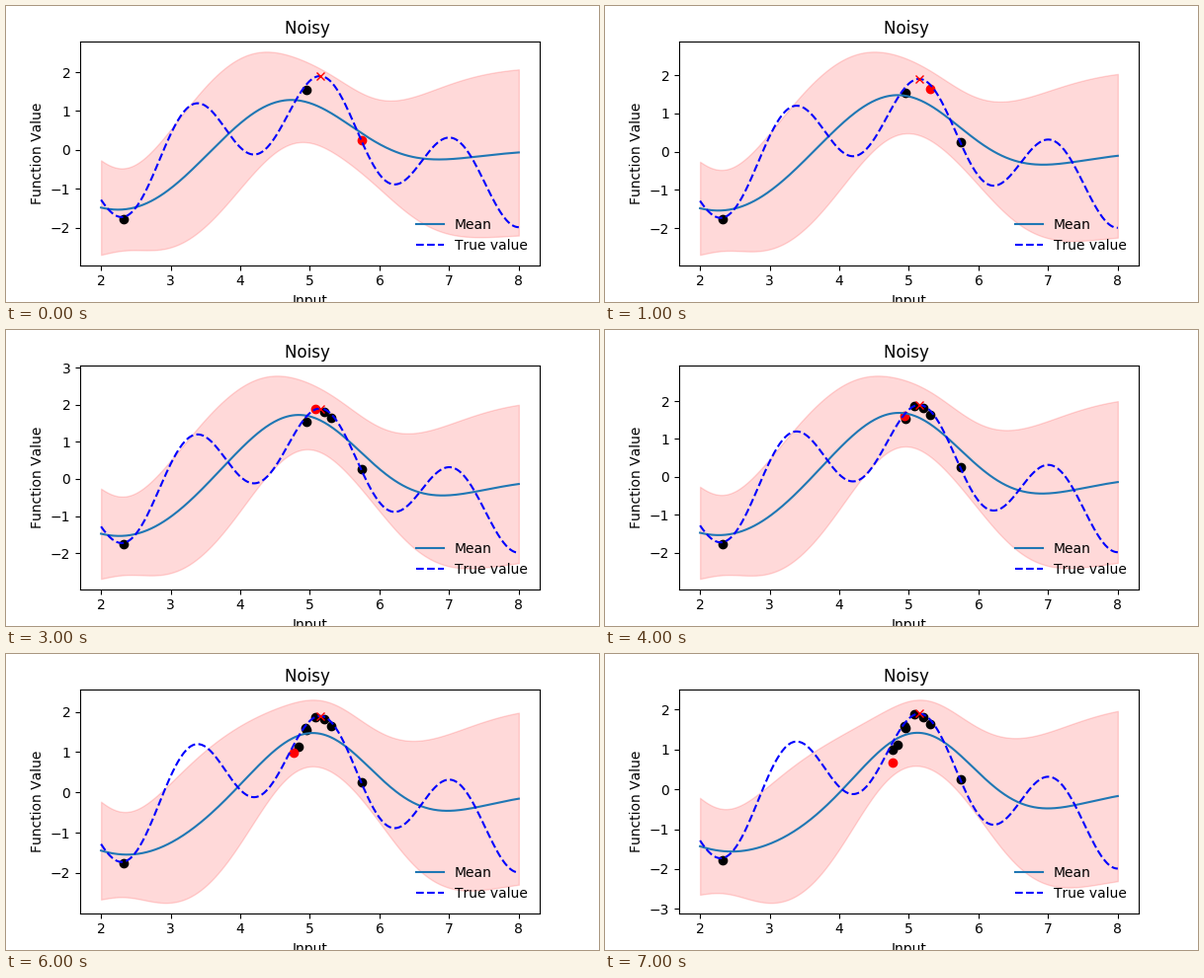
Animation, 600 px wide and 300 px high, one loop 8 s. Source, as a matplotlib script:

```python
import numpy as np
import matplotlib.pyplot as plt
from matplotlib.animation import FuncAnimation

plt.rcParams["text.kerning_factor"] = 6

NOISE = 0.15
LO, HI = 2, 8
FIRST = 3  # samples known at the start

# Noisy samples in the order they are taken
SAMPLES = np.array([
    (2.33, -1.77), (4.95, 1.54), (5.75, 0.26), (5.3, 1.64), (5.2, 1.82),
    (5.08, 1.88), (4.94, 1.6), (4.83, 1.13), (4.77, 0.99), (4.76, 0.67),
])

grid = np.linspace(LO, HI, 300)


def truth(x):
    return -np.sin(x) - np.sin(10 * x / 3)


def kernel(a, b):
    return np.exp(-0.5 * (a[:, None] - b[None, :]) ** 2)


def posterior(x, y):
    """Gaussian process mean and predictive deviation on the grid."""
    gram = kernel(x, x) + NOISE * np.eye(len(x))
    cross = kernel(x, grid)
    weights = np.linalg.solve(gram, cross)
    var = 1 + NOISE - np.sum(cross * weights, axis=0)
    return weights.T @ y, np.sqrt(var)


fig, ax = plt.subplots(figsize=(6, 3), dpi=100)
fig.subplots_adjust(left=0.125, right=0.9, bottom=0.125, top=0.88)
true_y = truth(grid)
best = np.argmax(true_y)


def draw(step):
    x, y = SAMPLES[:FIRST + step].T
    mean, dev = posterior(x, y)

    ax.clear()
    # The curves run over the sample dots
    ax.plot(x[:-1], y[:-1], "ko")
    ax.plot(x[-1], y[-1], "ro")
    ax.plot(grid, mean, color="#1f77b4", label="Mean")
    ax.fill_between(grid, mean - 2 * dev, mean + 2 * dev, color="r", alpha=0.15)
    ax.plot(grid, true_y, "b--", label="True value")
    ax.plot(grid[best], true_y[best], "rx")
    ax.set_title("Noisy ")
    ax.set_xlabel("Input")
    ax.set_ylabel("Function Value")
    ax.legend(loc="lower right", frameon=False)
    return ax.get_children()


anim = FuncAnimation(fig, draw, frames=len(SAMPLES) - FIRST + 1, interval=1000,
                     init_func=lambda: draw(0), repeat=True, repeat_delay=0)
plt.show()
```
